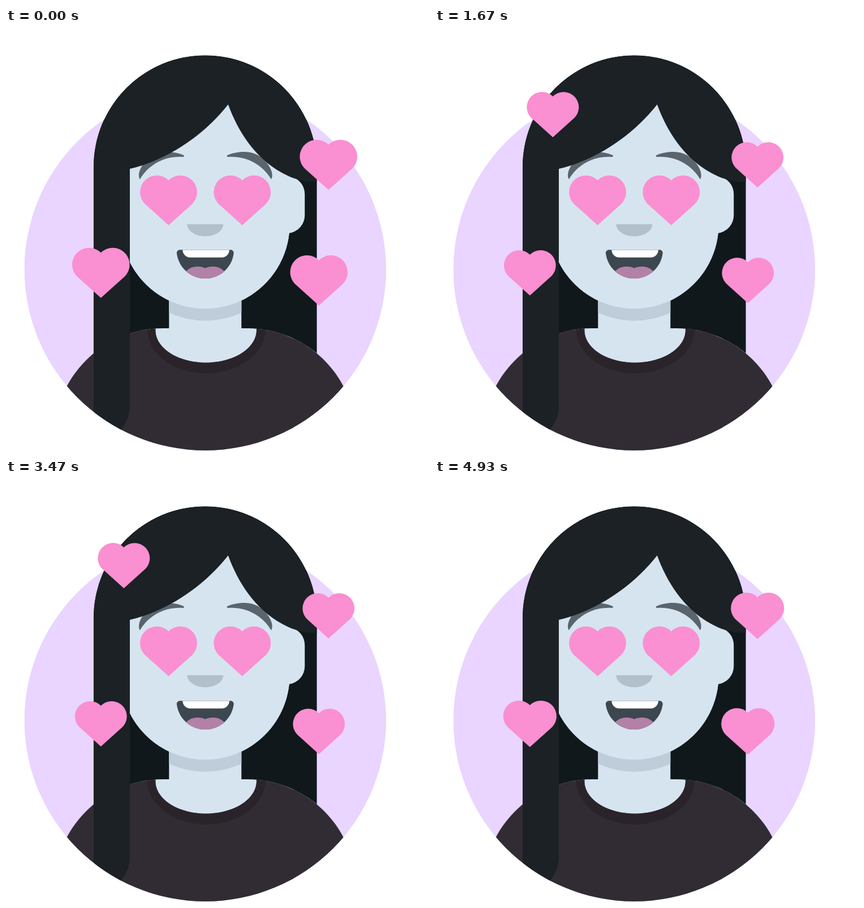
Animation, 748 px wide and 748 px high, one loop 4990 ms. Source, as an HTML page:

```html
<!DOCTYPE html>
<html lang="en">
<head>
<meta charset="utf-8">
<title>Heart eyes avatar</title>
<style>
  html, body { margin: 0; width: 100%; height: 100%; overflow: hidden; background: #fff; }
  svg { display: block; width: 100vw; height: 100vh; }
  .skin { fill: #d6e4f0; }
  .hair { fill: #1b2125; }
  .back { fill: #10181c; }
  .heart { fill: #fa8fd1; }
</style>
</head>
<body>
<svg viewBox="0 0 748 748">
  <defs>
    <path id="heart" d="M0 44 L-41.7 6.4 A29.5 29.5 0 0 1 -20.8 -44 A29.5 29.5 0 0 1 0 -35.4
      A29.5 29.5 0 0 1 20.8 -44 A29.5 29.5 0 0 1 41.7 6.4 Z"/>
    <path id="brow" d="M98.800 83.600 L99.700 83.200 C104.900 81.100 112.900 82 117.700 84.300
      C118.300 84.600 117.900 85.450 117.300 85.400 C102.400 84.250 92.400 93.550 88.950 99.850
      C88.850 100.050 88.550 100.050 88.450 99.900 C86.150 94.550 92.900 85.900 98.800 83.600 Z"/>
    <path id="mouth" d="M113.100 149.100 C114.200 158.600 122.200 166 132 166 S149.900 158.600 150.900 149
      C151 148.300 150.100 147 149 147 H115.100 C114 147 113 148.200 113.100 149.100 Z"/>
    <clipPath id="silhouette">
      <circle cx="132" cy="160" r="120"/>
      <path d="M58 210 V92 A74 74 0 0 1 206 92 V210 Z"/>
    </clipPath>
    <clipPath id="popArea">
      <use href="#clipCircle"/>
      <circle cx="352.3" cy="427" r="320"/>
      <path d="M155 560 V245.600 A197.300 197.300 0 0 1 549.600 245.600 V560 Z"/>
    </clipPath>
    <clipPath id="neckArea"><path d="M108 165 H156 V200 H108 Z"/></clipPath>
    <clipPath id="mouthArea"><use href="#mouth"/></clipPath>
  </defs>

  <!-- shows only where the floating heart leaves the silhouette -->
  <use id="popBack" class="heart" href="#heart"/>

  <g transform="translate(.3 .3) scale(2.66667)">
    <g clip-path="url(#silhouette)">
      <circle cx="132" cy="160" r="120" fill="#e9d5ff"/>
      <path class="back" d="M58 92 A74 74 0 0 1 206 92 V240 H58 Z"/>

      <!-- head, ears, neck and shoulders -->
      <path class="skin" d="M156 180.600 V199 H160 A72 72 0 0 1 232 271 V280 H32 V271 A72 72 0 0 1 104 199
        H108 V180.600 A56 56 0 0 1 76.300 135.900 A12 12 0 0 1 66 124 V110 A12 12 0 0 1 76 98.200
        V92 A56 56 0 0 1 188 92 V98.200 A12 12 0 0 1 198 110 V124 A12 12 0 0 1 187.700 135.900
        A56 56 0 0 1 156 180.600 Z"/>
      <circle cx="132" cy="138" r="56" fill="#bfcdda" clip-path="url(#neckArea)"/>
      <circle class="skin" cx="132" cy="130" r="56"/>

      <path fill="#312c34" d="M165.960 199.300 C202.940 202.320 232 233.300 232 271 V280 H32 V271
        C32 232.950 61.600 201.760 99.050 199.220 L99 200.350 C99 212.200 114 221.830 132.500 221.830
        S166 212.200 166 200.350 Z"/>
      <path fill="#2a242a" d="M93.500 199.800 C93.500 216 111 229 132.600 229 S172 216 172 199.900
        L166 199.300 V200.350 C166 212.200 151 221.830 132.500 221.830 S99 212.200 99 200.350 V199.220 Z"/>

      <g fill="#59646d">
        <use href="#brow"/>
        <use href="#brow" transform="matrix(-1 0 0 1 264.4 0)"/>
      </g>
      <path fill="#b2c0cc" d="M120 130 C120 134.400 125.400 138 132 138 S144 134.400 144 130 Z"/>

      <use href="#mouth" fill="#3d474f"/>
      <g clip-path="url(#mouthArea)">
        <rect x="117" y="136" width="31" height="16" rx="5" fill="#fff"/>
        <g fill="#b381a8">
          <circle cx="127" cy="169" r="11"/>
          <circle cx="137" cy="169" r="11"/>
        </g>
      </g>

      <path class="hair" d="M58 92 A74 74 0 0 1 206 92 V102 C198.700 102 193 100.700 187.500 98.200
        C166.500 88.800 154.100 69.400 147.200 50.600 C129.300 73.200 105 87.800 82 93.300
        V250.500 A24 24 0 0 1 58 274.500 Z"/>
    </g>
  </g>

  <g class="heart">
    <use href="#heart" transform="translate(287.5 304.8)"/>
    <use href="#heart" transform="translate(417.8 304.8)"/>
    <use class="beat" href="#heart" data-x="570.3" data-y="242"/>
    <use class="beat" href="#heart" data-x="553.3" data-y="446.4"/>
    <use class="beat" href="#heart" data-x="167.8" data-y="433"/>
    <g id="popFront"><use id="pop" href="#heart"/></g>
  </g>
</svg>
<script>
  const LOOP = 4990, STEP = 200 / 3, BEAT = 900, PEAK = 2.5 * STEP;
  const BIG = 1.13, SMALL = 0.8;
  const FADE = 10 * STEP, LEAVE = 4000, DRIFT = 58;
  const pop = document.getElementById("pop");
  const popFront = document.getElementById("popFront");
  const popBack = document.getElementById("popBack");
  const beats = document.querySelectorAll(".beat");
  const clamp = v => Math.min(1, Math.max(0, v));

  // triangle wave between BIG and SMALL
  function beatScale(t) {
    const p = ((t - PEAK + BEAT) % BEAT) / BEAT;
    return SMALL + (BIG - SMALL) * Math.abs(1 - 2 * p);
  }

  function place(el, x, y, s) {
    el.setAttribute("transform", `translate(${x} ${y}) scale(${s})`);
  }

  function draw(now) {
    const t = Math.floor((now % LOOP + 3.4) / STEP) * STEP;
    const s = beatScale(t);
    for (const el of beats) place(el, el.dataset.x, el.dataset.y, s);

    const enter = clamp(t / FADE), leave = clamp((t - LEAVE) / FADE);
    const alpha = enter - leave, solid = alpha > 0.35;
    const y = 153.3 + DRIFT * (1 - enter - leave);
    place(pop, 208.4, y, s);
    place(popBack, 208.4, y, s);
    pop.setAttribute("opacity", alpha);
    popBack.setAttribute("opacity", solid ? 1 : 0);
    popFront.setAttribute("clip-path", solid ? "none" : "url(#popArea)");
  }

  const start = performance.now();
  function tick() {
    draw(performance.now() - start);
    requestAnimationFrame(tick);
  }
  tick();
</script>
</body>
</html>
```
